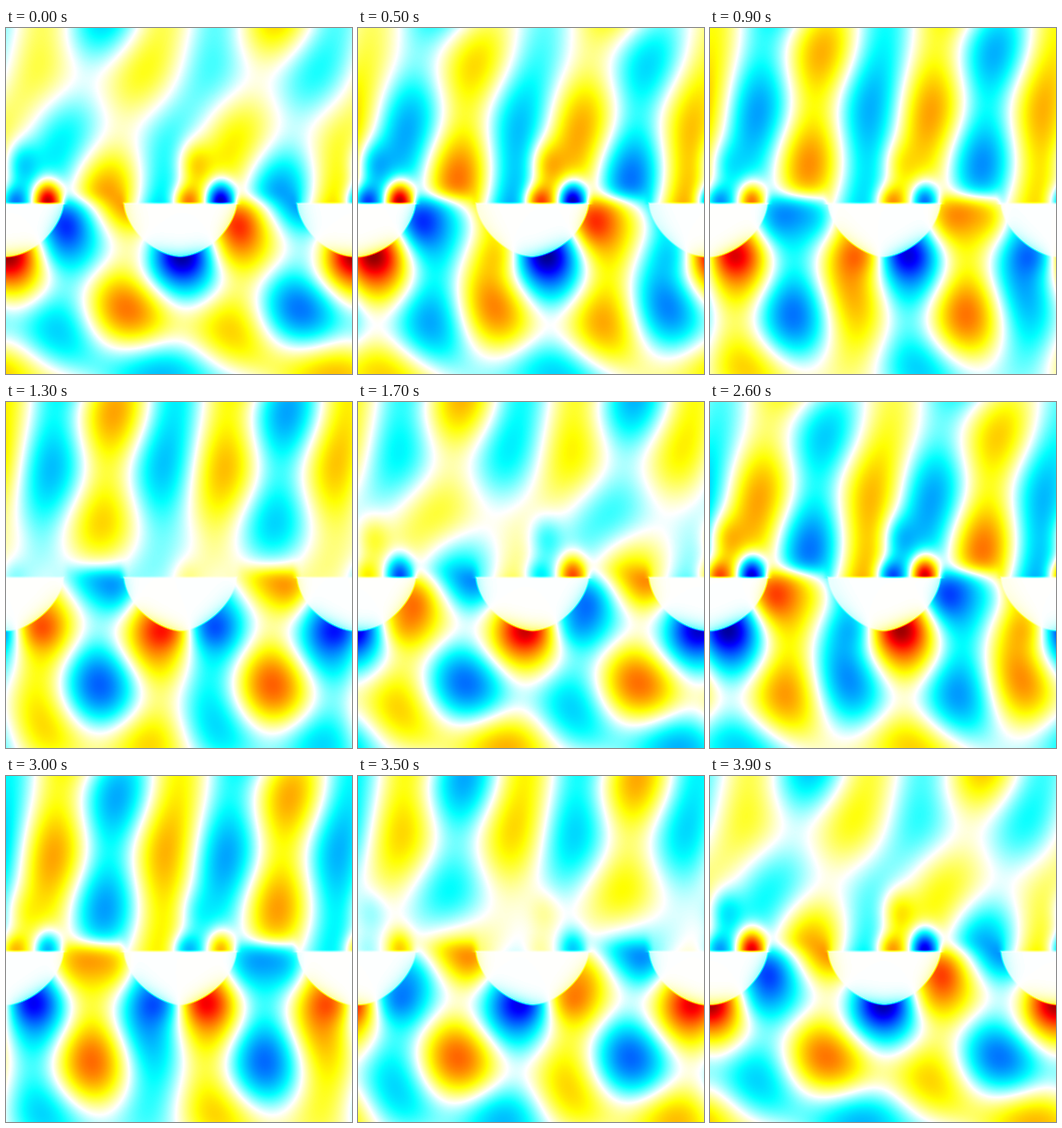
Write a matplotlib script that moves like this. It is 400 px wide and 400 px high and loops after 4 s.

```python
import numpy as np
import matplotlib.pyplot as plt
from matplotlib.animation import FuncAnimation
from matplotlib.colors import LinearSegmentedColormap

SIZE = 400
PITCH = 200          # grating period; the field flips sign from cell to cell
FRAMES = 40
INTERVAL = 100
PLATE_X, PLATE_Y = 201.5, 202.5
PLATE_RX, PLATE_RY = 65, 62
ROUNDNESS = 1.7      # exponent of the plate's outline, 2 is an ellipse

axis = np.arange(SIZE) + 0.5
x, y = np.meshgrid(axis, axis)


def wave(order, amp, phase, ky, y0=0, growth=0):
    """Complex plane wave of one diffraction order, angles in degrees."""
    kx = order * 180 / PITCH
    angle = np.radians(phase + kx * x + ky * (y - y0))
    return amp * np.exp(growth * (y - y0) + 1j * angle)


def blob(cx, cy, amp, sx, sy, kx=0):
    """Gaussian near field, repeated with alternating sign in every cell."""
    total = np.zeros((SIZE, SIZE), complex)
    for n in range(-1, 4):
        dx = x - cx - n * PITCH
        shape = np.exp(-(dx / sx) ** 2 / 2 - ((y - cy) / sy) ** 2 / 2)
        total += (-1) ** n * amp * shape * np.exp(1j * np.radians(kx * dx))
    return total


def upper_field():
    orders = (
        wave(1, 0.05, 45, -2.62)
        + wave(-1, 0.065, 245, -2.62)
        + wave(-3, 0.235, 102, -0.606)
        + wave(3, 0.075, 140, -0.27, growth=0.0052)
    )
    near = (
        blob(48, 202, 1.2 + 0.65j, 11.5, 17)
        + blob(8, 202, -0.57 - 0.42j, 12, 14)
        + blob(16, 158, -0.34 - 0.14j, 14, 20)
    )
    return orders + near


def lower_field():
    orders = (
        wave(1, 0.18, 289, -2.62, 300)
        + wave(1, 0.09, 109, 2.62, 300)
        + wave(-1, 0.06, 63, 2.62, 300)
        + wave(3, 0.17, -18, -0.607, 300)
        + wave(3, 0.17, 12, 0.607, 300)
        + wave(-3, 0.06, 151, 0.607, 300)
    )
    near = (
        blob(5, 262, 0.34, 35, 16, kx=2.7)
        + blob(68, 228, -0.22 - 0.12j, 16, 18)
        + blob(132, 222, -0.2j, 16, 22)
    )
    return orders + near


def build_field():
    dx = (x - PLATE_X + PITCH / 2) % PITCH - PITCH / 2
    dy = y - PLATE_Y

    # Both halves meet smoothly in the gap between the plates.
    in_gap = np.clip((np.abs(dx) - 58) / 14, 0, 1)
    in_gap = in_gap ** 2 * (3 - 2 * in_gap)
    below = 1 / (1 + np.exp(-(y - 196) / 6))
    below = np.where(dy < 2, in_gap * below, below)
    field = upper_field() * (1 - below) + lower_field() * below

    # Only a faint field leaks into the plates and dies out quickly.
    rho = (np.abs(dx / PLATE_RX) ** ROUNDNESS
           + np.abs(dy / PLATE_RY) ** ROUNDNESS) ** (1 / ROUNDNESS)
    depth = (1 - rho) * PLATE_RX
    outside = np.clip(0.5 - depth / 3, 0, 1)
    above = np.clip(0.5 - dy / 3, 0, 1)
    leak = 0.2 * np.exp(-np.maximum(depth, 0) / 9)
    return field * np.maximum(np.maximum(outside, above), leak)


cmap = LinearSegmentedColormap.from_list("wave", [
    (0.0, (0, 0, 0.5)),
    (0.125, (0, 0, 1)),
    (0.375, (0, 1, 1)),
    (0.5, (1, 1, 1)),
    (0.625, (1, 1, 0)),
    (0.875, (1, 0, 0)),
    (1.0, (0.5, 0, 0)),
], N=512)

field = build_field()

fig = plt.figure(figsize=(4, 4), dpi=100)
ax = fig.add_axes([0, 0, 1, 1])
ax.axis("off")
image = ax.imshow(field.real, cmap=cmap, vmin=-1, vmax=1,
                  interpolation="nearest", aspect="auto")


def update(frame):
    turn = np.exp(-2j * np.pi * frame / FRAMES)
    image.set_data((field * turn).real)
    return [image]


anim = FuncAnimation(fig, update, frames=FRAMES, interval=INTERVAL,
                     repeat=True, repeat_delay=0, blit=False)
plt.show()
```
